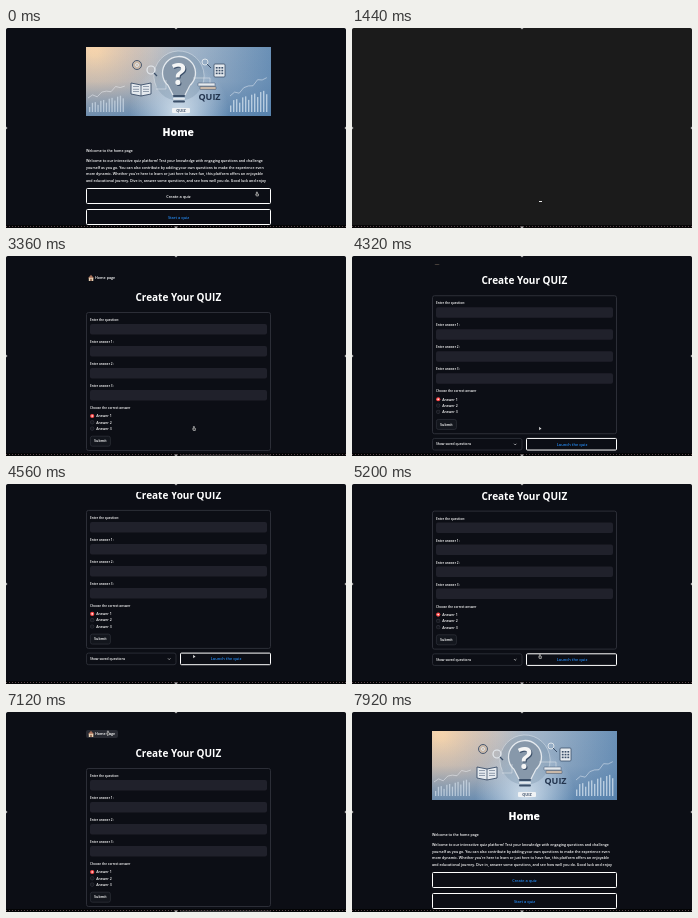
These frames come from a looping animation (340x200 px, 8000 ms). An HTML page with a canvas:

```html
<!DOCTYPE html>
<html lang="en">
<head>
<meta charset="utf-8">
<title>Quiz app</title>
<style>
html, body { margin: 0; width: 100%; height: 100%; overflow: hidden; background: #0c0e15; }
canvas { display: block; width: 340px; height: 200px; }
</style>
</head>
<body>
<canvas id="stage"></canvas>
<script>
const LOOP = 8000, STEP = 80;
const BG = '#0c0e15', BLANK = '#1b1b1b', WHITE = '#ffffff', BLUE = '#2589f0', LINE = '#30333b', FIELD = '#20212b';
const canvas = document.getElementById('stage');
const ctx = canvas.getContext('2d');
const ratio = Math.max(1, window.devicePixelRatio || 1);
canvas.width = 340 * ratio;
canvas.height = 200 * ratio;

const clamp = x => Math.min(1, Math.max(0, x));
const part = (t, a, b) => clamp((t - a) / (b - a));
const smooth = x => x * x * (3 - 2 * x);
const easeOut = x => 1 - Math.pow(1 - x, 1.6);
const mix = (a, b, k) => a + (b - a) * k;

function rect(x, y, w, h, color) {
  ctx.fillStyle = color;
  ctx.fillRect(x, y, w, h);
}

function box(x, y, w, h, r, fill, stroke, width = 1) {
  ctx.beginPath();
  ctx.roundRect(x, y, w, h, r);
  if (fill) { ctx.fillStyle = fill; ctx.fill(); }
  if (stroke) { ctx.strokeStyle = stroke; ctx.lineWidth = width; ctx.stroke(); }
}

function disc(x, y, r, fill) {
  ctx.beginPath();
  ctx.arc(x, y, r, 0, 7);
  ctx.fillStyle = fill;
  ctx.fill();
}

function ring(x, y, r, color, width = 0.6, from = 0, to = 7) {
  ctx.beginPath();
  ctx.arc(x, y, r, from, to);
  ctx.strokeStyle = color;
  ctx.lineWidth = width;
  ctx.stroke();
}

function path(points, color, width) {
  ctx.beginPath();
  points.forEach(([x, y]) => ctx.lineTo(x, y));
  if (width) {
    ctx.strokeStyle = color;
    ctx.lineWidth = width;
    ctx.stroke();
  } else {
    ctx.fillStyle = color;
    ctx.fill();
  }
}

function text(s, x, y, size, color = WHITE, align = 'left', weight = 600) {
  ctx.font = `${weight} ${size}px "Open Sans", "Noto Sans", sans-serif`;
  ctx.textAlign = align;
  ctx.textBaseline = 'alphabetic';
  ctx.fillStyle = color;
  ctx.fillText(s, x, y);
}

function faded(alpha, draw) {
  if (alpha <= 0) return;
  ctx.save();
  ctx.globalAlpha = alpha;
  draw();
  ctx.restore();
}

function wash(gradient, stops) {
  stops.forEach(([k, c]) => gradient.addColorStop(k, c));
  rect(80, 19, 185, 69, gradient);
}

function banner() {
  ctx.save();
  ctx.beginPath();
  ctx.rect(80, 19, 185, 69);
  ctx.clip();
  wash(ctx.createLinearGradient(80, 0, 265, 0),
    [[0, '#b7b9bd'], [0.35, '#b4bdc8'], [0.6, '#9fb3c8'], [1, '#6a90b6']]);
  wash(ctx.createRadialGradient(88, 24, 4, 88, 24, 85),
    [[0, 'rgba(250,214,172,.95)'], [0.5, 'rgba(235,200,170,.5)'], [1, 'rgba(225,200,180,0)']]);
  wash(ctx.createLinearGradient(0, 19, 0, 88),
    [[0, 'rgba(80,120,165,0)'], [0.5, 'rgba(85,125,168,.15)'], [1, 'rgba(80,125,170,.75)']]);
  wash(ctx.createRadialGradient(173, 84, 2, 173, 84, 50),
    [[0, 'rgba(225,236,245,.8)'], [1, 'rgba(225,236,245,0)']]);

  // chart bars and trend lines
  for (let i = 0; i < 13; i++) {
    const h = 5 + i * 0.7 + 4 * Math.abs(Math.sin(i * 2.1));
    rect(83 + i * 2.8, 84 - h, 1.3, h, 'rgba(215,228,240,.65)');
    rect(224 + i * 3, 84 - h * 1.3, 1.4, h * 1.3, 'rgba(220,232,244,.7)');
  }
  const trend = (x, y, rise) => path(Array.from({ length: 9 },
    (_, i) => [x + i * 4.6, y - i * rise - 2 * Math.sin(i * 2.3)]), 'rgba(245,248,252,.75)', 0.6);
  trend(82, 70, 1.6);
  trend(224, 68, 2.4);

  // circles behind the bulb
  const ink = '#3b4f69', pale = '#e4e9ee';
  disc(173, 48, 25, 'rgba(110,135,160,.3)');
  ring(173, 48, 25, 'rgba(235,240,245,.6)', 0.7, 2.7, 6.7);

  // bulb
  const glass = '#8798aa';
  disc(173, 45, 16.5, glass);
  path([[162.5, 57], [183.5, 57], [179, 68], [167, 68]], glass);
  ring(173, 45, 16.5, pale, 1.3, 2.3, 7.12);
  path([[162, 57.3], [167, 67]], pale, 1.2);
  path([[184, 57.3], [179, 67]], pale, 1.2);
  text('?', 174, 57.5, 30, ink, 'center', 700);
  text('?', 173, 57, 30, '#f4f5f5', 'center', 700);
  for (let i = 0; i < 3; i++) box(167, 67 + i * 2.8, 12, 2, 1, i % 2 ? pale : ink);

  // book
  const book = [[125, 55], [135, 57], [145, 55], [145, 66], [135, 68], [125, 66], [125, 55]];
  path(book, pale);
  path(book, ink, 0.9);
  path([[135, 57], [135, 68]], ink, 0.8);
  for (let i = 0; i < 3; i++) {
    rect(127, 58.5 + i * 2.4, 6, 0.5, ink);
    rect(137, 58.5 + i * 2.4, 6, 0.5, ink);
  }

  // small icons
  disc(131, 37, 4.5, '#c9b8a8');
  ring(131, 37, 4.5, ink, 0.9);
  ring(131, 37, 1.5, pale, 0.9);
  ring(145, 42, 4, pale, 1.2);
  path([[148, 45], [151, 48]], ink, 1.2);
  ring(199, 34, 3, pale, 0.9);
  path([[201, 36], [205, 40]], ink, 1);
  box(208, 36, 11, 13, 1, pale, ink, 0.8);
  for (let i = 0; i < 9; i++) rect(209.8 + i % 3 * 2.8, 39 + Math.floor(i / 3) * 2.8, 1.8, 1.6, ink);
  path([[150, 61], [160, 61], [160, 52]], pale, 0.5);
  path([[187, 50], [204, 50], [204, 56]], pale, 0.5);

  // books above the label
  box(192, 55, 17, 3, 0.5, pale, ink, 0.5);
  box(194, 58.5, 16, 3, 0.5, '#c9b8a8', ink, 0.5);
  text('QUIZ', 203.5, 71.8, 9, '#22344e', 'center', 700);
  box(166, 80, 18, 5, 1, '#f1f3f5');
  text('QUIZ', 175, 84, 3.8, ink, 'center', 700);
  ctx.restore();
}

const intro = [
  'Welcome to our interactive quiz platform! Test your knowledge with engaging questions and challenge',
  'yourself as you go. You can also contribute by adding your own questions to make the experience even',
  'more dynamic. Whether you\'re here to learn or just here to have fun, this platform offers an enjoyable',
  'and educational journey. Dive in, answer some questions, and see how well you do. Good luck and enjoy'
];

function home(p) {
  banner();
  text('Home', 172.3, 108.3, 10.4, WHITE, 'center', 800);
  text('Welcome to the home page', 80, 124.2, 3.55, WHITE);
  intro.forEach((s, i) => text(s, 80, 134 + i * 6.7, 3.6));
  [['Create a quiz', 160], ['Start a quiz', 181]].forEach(([s, y]) => {
    const over = p.x > 80 && p.x < 265 && p.y > y && p.y < y + 16;
    box(80.5, y + 0.5, 184, 15, 1, null, WHITE);
    text(s, 172.5, y + 9.5, 3.9, over ? WHITE : BLUE, 'center');
  });
}

function create(scroll, hover) {
  ctx.save();
  ctx.beginPath();
  ctx.rect(0, 8, 340, 192);
  ctx.clip();
  ctx.translate(0, -scroll);

  if (hover) box(80, 18, 32, 8, 2, '#282a32');
  path([[82, 22.2], [85, 18.8], [88, 22.2]], '#a8715a');
  rect(82.8, 21.8, 4.5, 3.2, '#e8d3b5');
  rect(84.3, 22.8, 1.4, 2.2, '#7a4a3a');
  text('Home page', 89, 23.4, 3.7);
  text('Create Your QUIZ', 172.3, 45.2, 10, WHITE, 'center', 700);

  box(80.5, 56.5, 184, 138, 2, null, LINE, 0.9);
  ['Enter the question:', 'Enter answer 1:', 'Enter answer 2:', 'Enter answer 3:'].forEach((s, i) => {
    text(s, 84, 65.2 + i * 22, 3.15);
    box(84, 68 + i * 22, 177, 10.5, 2, FIELD);
  });
  text('Choose the correct answer', 84, 153.2, 3.15);
  for (let i = 0; i < 3; i++) {
    const y = 160 + i * 6.3;
    disc(86.2, y, 2.1, i ? '#30323c' : '#ff4b4b');
    disc(86.2, y, i ? 1.5 : 0.8, i ? '#16181f' : WHITE);
    text('Answer ' + (i + 1), 90.2, y + 1.3, 3.5);
  }
  box(84.4, 180.2, 20, 10, 2, '#13161d', LINE, 0.7);
  text('Submit', 94.4, 186.4, 3.7, WHITE, 'center');

  box(80.5, 199.2, 89.5, 11.6, 2, null, LINE, 0.8);
  text('Show saved questions', 84, 206.2, 3.3);
  path([[162, 204.5], [163.2, 205.7], [164.4, 204.5]], WHITE, 0.6);
  box(174.5, 199.2, 90, 11.6, 1, null, WHITE);
  text('Launch the quiz', 220, 206.5, 4, BLUE, 'center');
  ctx.restore();
}

function skeleton() {
  const tone = '#20232c';
  box(80, 43, 130, 10.5, 2, tone);
  [0.98, 1, 0.96, 0.65].forEach((w, i) => box(80, 70 + i * 8.4, 185.5 * w, 4.2, 1.5, tone));
  box(80, 117, 139, 38, 2, tone);
}

function pointer(t) {
  const stops = [[0, 251, 166], [160, 290, 186], [240, 290, 186], [1120, 188, 172.5],
    [6000, 188, 172.5], [6880, 101.5, 20.5], [6960, 102, 21], [LOOP, 102, 21]];
  const i = stops.findIndex(s => s[0] > t) - 1;
  const [a, b] = [stops[i], stops[i + 1]];
  const k = smooth(part(t, a[0], b[0]));
  return { x: mix(a[1], b[1], k), y: mix(a[2], b[2], k) };
}

function hand(p) {
  const points = [[-0.6, -2], [0.4, -2], [0.4, -0.3], [1.6, 0], [1.3, 2], [-0.7, 2], [-1.4, 0.2], [-0.6, 0.4], [-0.6, -2]]
    .map(([x, y]) => [p.x + x, p.y + y]);
  path(points, '#3a3a3a');
  path(points, '#d0d0d0', 0.6);
}

function arrow(p) {
  path([[p.x - 0.8, p.y - 1.8], [p.x + 1.6, p.y + 0.6], [p.x + 0.3, p.y + 0.7], [p.x - 0.8, p.y + 1.7]], '#e8e8e8');
}

function frameMarks() {
  rect(0, 197, 340, 3, 'rgba(0,0,0,.75)');
  for (let x = 0; x < 340; x += 3) rect(x, 198, 1, 1, '#5a454c');
  [[170, 0], [0, 100], [340, 100], [170, 199.5], [0, 0], [340, 0]]
    .forEach(([x, y]) => disc(x, y, 1.3, '#a4a4a4'));
}

function draw(t) {
  ctx.setTransform(ratio, 0, 0, ratio, 0, 0);
  const p = pointer(t);
  const blank = t >= 1440 && t < 2960;
  rect(0, 0, 340, 200, blank ? BLANK : BG);

  if (t < 1440) {
    faded(1 - 0.85 * part(t, 1120, 1440), () => home(p));
  } else if (t >= 2960 && t < 3360) {
    faded(part(t, 2880, 3120), skeleton);
  } else if (t >= 3360 && t < 7520) {
    const scroll = 42 * (easeOut(part(t, 4080, 4960)) - easeOut(part(t, 5040, 5840)));
    faded(1 - 0.65 * part(t, 7120, 7440), () => create(scroll, t >= 6800));
  } else if (t >= 7520) {
    faded(mix(0.4, 1, part(t, 7520, 7920)), () => home(p));
  }

  if (blank) rect(187, 173, 3, 1, '#e8e8e8');
  else if (t >= 4160 && t < 5120) arrow(p);
  else if (t < 7520) hand(p);
  frameMarks();
}

function tick(now) {
  draw(Math.floor(now % LOOP / STEP) * STEP);
  requestAnimationFrame(tick);
}
draw(0);
requestAnimationFrame(tick);
</script>
</body>
</html>
```
